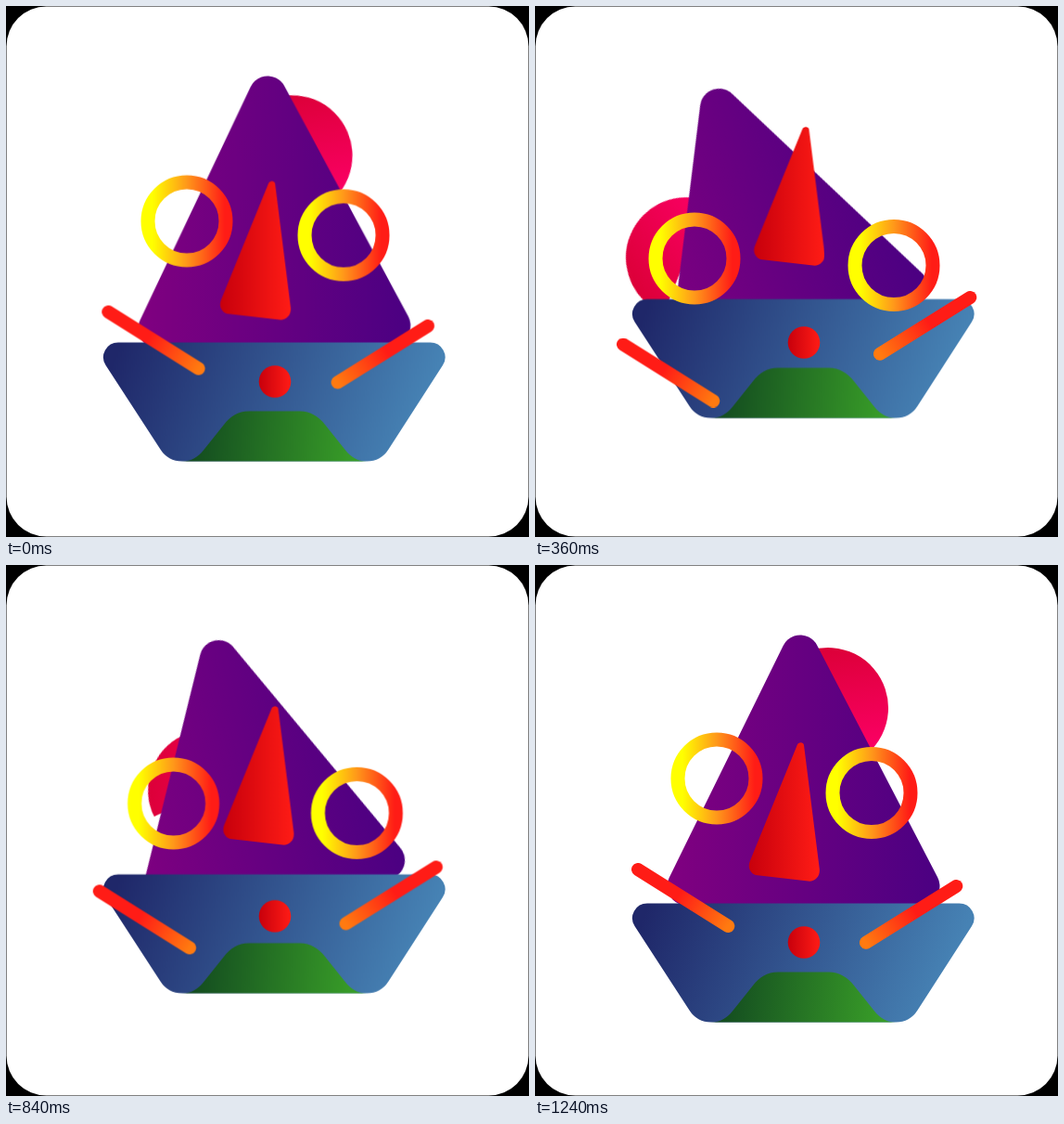
Animation, 564 px wide and 572 px high, one loop 1280 ms. Source, as an HTML page:

```html
<!DOCTYPE html>
<html lang="en">
<head>
<meta charset="utf-8">
<title>Sailing face</title>
<style>
  html, body { margin: 0; width: 100%; height: 100%; overflow: hidden; background: #000; }
  svg { display: block; width: 100vw; height: 100vh; }
  .ring { fill: none; stroke-width: 15; }
  .bar { stroke-width: 14; stroke-linecap: round; }
  #sun { transform-origin: 343.4px 140px; }
  #sail { transform-origin: 286px 346px; }
</style>
</head>
<body>
<svg viewBox="0 0 564 572">
  <defs>
    <linearGradient id="pink" gradientUnits="userSpaceOnUse" x1="310" y1="89" x2="330" y2="219">
      <stop stop-color="#dc0038"/><stop offset="1" stop-color="#ff006a"/>
    </linearGradient>
    <linearGradient id="purple" gradientUnits="userSpaceOnUse" x1="143" y1="0" x2="436" y2="0">
      <stop stop-color="#800080"/><stop offset="1" stop-color="#4b0082"/>
    </linearGradient>
    <linearGradient id="blue" gradientUnits="userSpaceOnUse" x1="125" y1="360" x2="430" y2="480">
      <stop stop-color="#1f2769"/><stop offset="1" stop-color="#4682b4"/>
    </linearGradient>
    <linearGradient id="green" gradientUnits="userSpaceOnUse" x1="205" y1="455" x2="375" y2="475">
      <stop stop-color="#144d20"/><stop offset="1" stop-color="#389c28"/>
    </linearGradient>
    <linearGradient id="red">
      <stop stop-color="#c8000c"/><stop offset="1" stop-color="#ff1c16"/>
    </linearGradient>
    <linearGradient id="fire" x1="-.08" x2="1.08">
      <stop offset=".12" stop-color="#ffff00"/><stop offset=".5" stop-color="#ff981a"/><stop offset=".92" stop-color="#ff1c16"/>
    </linearGradient>
    <linearGradient id="glowL" gradientUnits="userSpaceOnUse" x1="111" y1="328" x2="208" y2="389">
      <stop offset=".45" stop-color="#ff1c16"/><stop offset="1" stop-color="#ff7a10"/>
    </linearGradient>
    <linearGradient id="glowR" gradientUnits="userSpaceOnUse" x1="454" y1="346" x2="357" y2="407">
      <stop offset=".45" stop-color="#ff1c16"/><stop offset="1" stop-color="#ff7a10"/>
    </linearGradient>
  </defs>

  <rect width="564" height="572"/>
  <rect x=".5" y=".5" width="563" height="571" rx="43" fill="#fff"/>

  <path id="sun" fill="url(#pink)" d="M273.4 104.9A65 65 0 0 1 358.6 203.1Z"/>
  <path id="sail" fill="url(#purple)" stroke="url(#purple)" stroke-width="41" stroke-linejoin="round" d="M286 96L416 346H163Z"/>
  <g id="boat">
    <path fill="url(#blue)" d="M121 364.5H457.5A16 16 0 0 1 471 389.1L412.6 479.5A28 28 0 0 1 389 492.5H190A28 28 0 0 1 166.4 479.5L107.5 389.1A16 16 0 0 1 121 364.5Z"/>
    <path fill="url(#green)" d="M190 492.5C200 492.5 207 488 213 480.5L235 453C242 444 250 438.5 262 438.5H317C328 438.5 337 444 344 453L366 480.5C372 488 379 492.5 389 492.5Z"/>
  </g>
  <circle id="mouth" cx="290" cy="406.5" r="17.3" fill="url(#red)"/>
  <path id="nose" fill="url(#red)" d="M282.7 194C284 190.2 289.4 190.2 290 194L306.8 327.5C307.6 335.5 302 341.3 294.5 340.6L240 334.3C232.5 333.3 228.8 326 231.8 319Z"/>
  <circle id="eyeL" class="ring" cx="196" cy="230" r="42" stroke="url(#fire)"/>
  <circle id="eyeR" class="ring" cx="363" cy="245.5" r="42" stroke="url(#fire)"/>
  <path id="barL" class="bar" stroke="url(#glowL)" d="M111 328L208.3 389"/>
  <path id="barR" class="bar" stroke="url(#glowR)" d="M454.3 346L357 406.7"/>
</svg>
<script>
  const LOOP = 1280, STEP = 40, MOVE = 288, OUT = -2, BACK = 720;

  // Total travel of each part: dx, dy, turn in degrees.
  const travel = {
    sun: [-205.3, 113, -117],
    sail: [-5.3, -0.4, -19.2],
    boat: [0, -48.7, 0],
    mouth: [0, -44, 0],
    nose: [5.5, -61, 0],
    eyeL: [-24, 42, 0],
    eyeR: [24, 34, 0],
    barL: [-16, 36.5, 0],
    barR: [15, -32, 0]
  };

  // cubic-bezier(.42, 0, .58, 1)
  function ease(x) {
    if (x <= 0) return 0;
    if (x >= 1) return 1;
    let lo = 0, hi = 1, s;
    for (let i = 0; i < 24; i++) {
      s = (lo + hi) / 2;
      const bx = 3 * s * (1 - s) * (0.42 * (1 - s) + 0.58 * s) + s ** 3;
      if (bx < x) lo = s; else hi = s;
    }
    return s * s * (3 - 2 * s);
  }

  const progress = t => ease((t - OUT) / MOVE) - ease((t - BACK) / MOVE);
  const count = LOOP / STEP;

  for (const [id, [dx, dy, turn]] of Object.entries(travel)) {
    const frames = Array.from({ length: count + 1 }, (_, i) => {
      const p = progress((i % count) * STEP);
      return {
        offset: i / count,
        easing: 'step-end',
        transform: `translate(${dx * p}px, ${dy * p}px) rotate(${turn * p}deg)`
      };
    });
    const anim = document.getElementById(id).animate(frames, { duration: LOOP, iterations: Infinity });
    anim.startTime = document.timeline.currentTime;
  }
</script>
</body>
</html>
```
